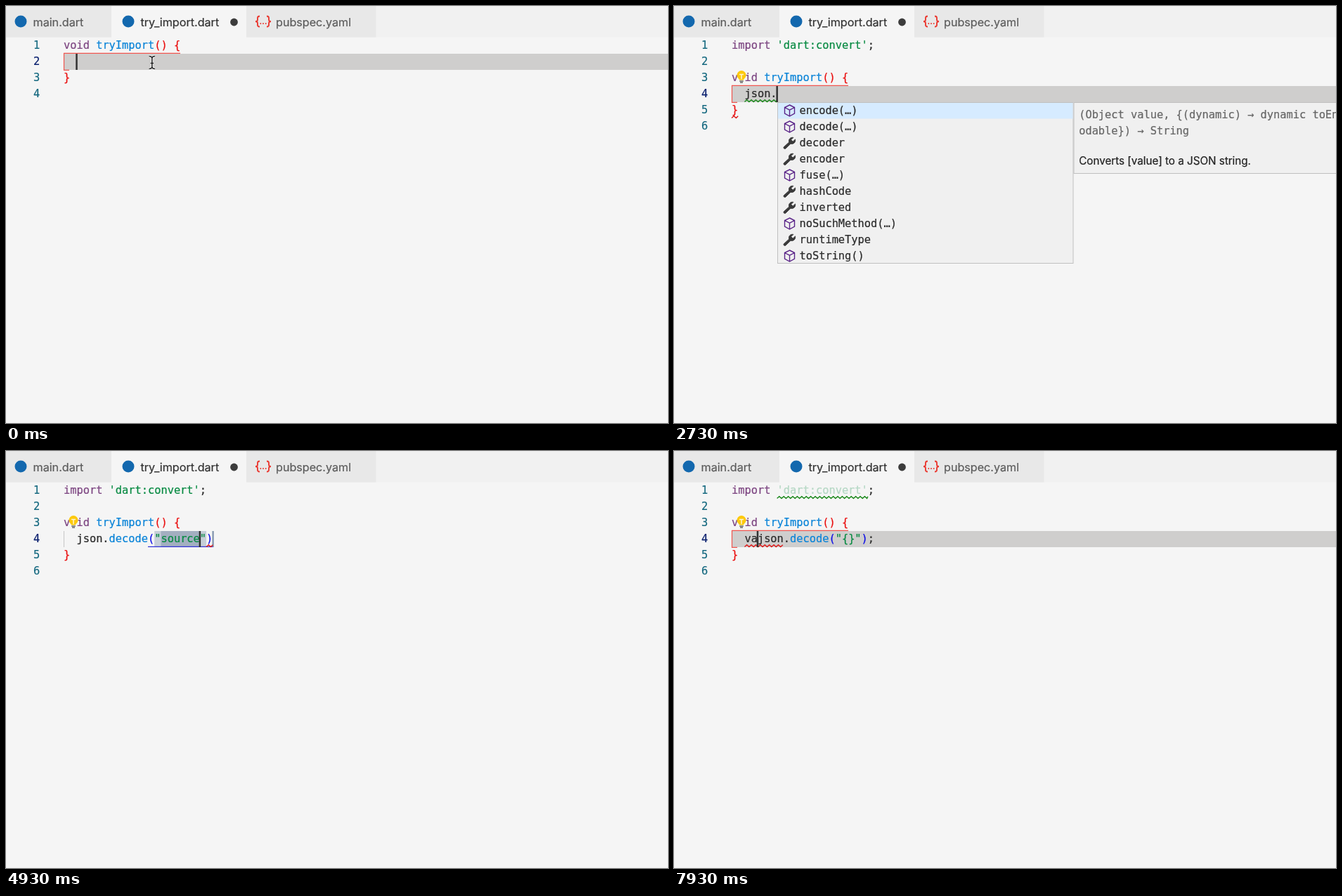
An HTML page for the animation above (8 s loop, 942 by 594 pixels).

```html
<!DOCTYPE html>
<html lang="en">
<head>
<meta charset="utf-8">
<title>Auto import</title>
<style>
html, body { margin: 0; width: 100%; height: 100%; overflow: hidden; background: #f5f5f5; }
svg { display: block; width: 100%; height: 100%; }
text { white-space: pre; }
.code { font: 15.33px "DejaVu Sans Mono", monospace; }
.ui { font: 15.2px Inter, sans-serif; }
.tab { font-size: 16.15px; }
</style>
</head>
<body>
<svg id="stage" viewBox="0 0 942 594"></svg>
<script>
const LOOP = 8000, CHAR = 9.23, LINE = 23, LEFT = 82, TOP = 45;
const C = {
  ink: '#2b2b2b', keyword: '#7d4682', fn: '#0a84d8', string: '#078a42',
  outer: '#ea1010', inner: '#1010e6', number: '#14687f', active: '#0b216f',
  error: '#dd1c1c', hint: '#1d8a1d'
};
const stage = document.getElementById('stage');

const colX = col => LEFT + col * CHAR;
const rowY = row => TOP + row * LINE;
const rect = (x, y, w, h, fill, extra = '') =>
  `<rect x="${x}" y="${y}" width="${w}" height="${h}" fill="${fill}" ${extra}/>`;
const path = (d, stroke, width = 1.3, fill = 'none') =>
  `<path d="${d}" stroke="${stroke}" stroke-width="${width}" fill="${fill}"/>`;
const circle = (x, y, r, fill) => `<circle cx="${x}" cy="${y}" r="${r}" fill="${fill}"/>`;
// A hairline outline gives the glyphs their slightly heavier look.
const paint = (fill, opacity = 1) =>
  `fill="${fill}" stroke="${fill}" stroke-width=".22" opacity="${opacity}" fill-opacity="${opacity}" stroke-opacity="${opacity}"`;
const text = (x, y, body, fill, cls = 'code') =>
  `<text x="${x}" y="${y}" class="${cls}" ${paint(fill)}>${body}</text>`;
const span = ([body, fill, opacity]) => `<tspan ${paint(fill, opacity)}>${body}</tspan>`;
const codeLine = (row, tokens) => text(LEFT, rowY(row) + 16, tokens.map(span).join(''), C.ink);

function squiggle(row, from, to, color) {
  const y = rowY(row) + 21, end = colX(to);
  let x = colX(from), d = `M${x} ${y + 1.6}`;
  for (let up = true; x < end - 1; up = !up) {
    x = Math.min(x + 3.2, end);
    d += `L${x} ${up ? y - 1.3 : y + 1.6}`;
  }
  return path(d, color, 1.4);
}

const icons = {
  method: path('M0-8L7-4.5V4L0 8L-7 4V-4.5ZM-7-4.5L0-.8L7-4.5M0-.8V8', '#5a2488', 1.4),
  field: path('M-5.5-4.5H-8V4.5H-5.5M5.5-4.5H8V4.5H5.5', '#424242', 1.5) +
    path('M-5-.8L1.5-4L5-2V1L-1.5 4.2L-5 2.2Z', '#0a57a5', .8, '#0a57a5') +
    path('M-3.6-.5L-1.4.7L3.5-1.6', '#f0f0f0', .9),
  type: path('M-2-1H3M.5-1V5H4', '#b87a1e', 1.4) +
    path('M-8.2-3L-3.5-7.7L0-4.6L-4.8.4Z', '#b87a1e', .6, '#b87a1e') +
    path('M3-1.2L5.4-3.6L8-1L5.6 1.4ZM3 5L5.4 2.6L8 5.2L5.6 7.6Z', '#b87a1e', .5, '#b87a1e'),
  prop: path('M-8.2 5.8L-.8-1C-2-5 1.2-8.6 5.4-7.6L2.2-4.4L4.7-1.9L8-5.1C9-1 5.6 2.3 1.4 1.3L-5.8 8.2Q-7 9-8.2 7.8Q-9 6.8-8.2 5.8Z', '#3a3a3a', .9, '#3a3a3a')
};

const typeRows = name => [['type', name], ['method', name + '(…)']];
const popups = {
  json: {
    match: 4, scroll: true,
    rows: [['field', 'json'], ['method', 'jsonDecode(…)'], ['method', 'jsonEncode(…)'],
      ...typeRows('JsonCodec'), ['method', 'JsonCodec.withReviver(…)'],
      ...['JsonCyclicError', 'JsonDecoder', 'JsonEncoder'].flatMap(typeRows)],
    sign: ["Auto import from 'dart:convert'", '', 'JsonCodec'],
    note: ['An instance of the default implementation of the', '[JsonCodec].']
  },
  members: {
    match: 0,
    rows: [['method', 'encode(…)'], ['method', 'decode(…)'], ['prop', 'decoder'], ['prop', 'encoder'],
      ['method', 'fuse(…)'], ['prop', 'hashCode'], ['prop', 'inverted'], ['method', 'noSuchMethod(…)'],
      ['prop', 'runtimeType'], ['method', 'toString()']],
    sign: ['(Object value, {(dynamic) → dynamic toEnc', 'odable}) → String'],
    note: ['Converts [value] to a JSON string.']
  },
  decode: {
    match: 1,
    rows: [['method', 'decode(…)'], ['prop', 'decoder']],
    sign: ['(String source, {(Object, Object) → dynam', 'ic reviver}) → dynamic'],
    note: ['Parses the string and returns the resulting Json object.']
  }
};

function popup({ match, rows, scroll, sign, note }, col, row) {
  const x = Math.round(colX(col)) + .5, y = rowY(row + 1) + .5, h = rows.length * LINE - 1;
  const docX = x + 421.5, docH = (sign.length + note.length + 1) * LINE + 9;
  const frame = 'stroke="#c0c0c0"';
  let out = rect(docX, y, 450, docH, '#f0f0f0', frame);
  out += rect(x, y, 420.5, h, '#f0f0f0', frame) + rect(x + .5, y + .5, 419.5, LINE - .5, '#d6ebff');
  rows.forEach(([icon, label], i) => {
    const mid = y + 11.5 + i * LINE;
    const head = `<tspan font-weight="bold" ${paint('#0a53a8')}>${label.slice(0, match)}</tspan>`;
    out += `<g transform="translate(${x + 17} ${mid})">${icons[icon]}</g>`;
    out += text(x + 31, mid + 5, (match ? head : '') + label.slice(match), C.ink);
  });
  if (scroll) out += rect(x + 407, y + .5, 13, 131, '#646464', 'fill-opacity=".45"');
  sign.forEach((line, i) => out += text(docX + 7.2, y + 22 + i * LINE, line, '#666'));
  const noteY = y + 19.5 + (sign.length + 1) * LINE;
  note.forEach((line, i) => out += text(docX + 7.2, noteY + i * LINE, line, '#222', 'ui'));
  return out;
}

function tabs() {
  const blue = '#1368ae', red = '#ea3a32';
  return rect(0, 0, 942, 44.5, '#f1f1f1') + rect(0, 0, 150, 44.5, '#e8e8e8') +
    rect(150, 0, 192, 45, '#f5f5f5') + rect(342, 0, 184.5, 44.5, '#e8e8e8') +
    circle(21, 22, 8.5, blue) + circle(174, 22, 8.5, blue) +
    text(38.5, 29, 'main.dart', '#5c5c5c', 'ui tab') +
    text(191.5, 29, 'try_import.dart', '#333', 'ui tab') +
    text(384, 29, 'pubspec.yaml', '#5c5c5c', 'ui tab') +
    circle(324.5, 23, 5.4, '#3c3c3c') +
    path('M361 14.5Q358 14.5 358 17V19.5Q358 22 355 22Q358 22 358 24.5V27Q358 29.5 361 29.5M371 14.5Q374 14.5 374 17V19.5Q374 22 377 22Q374 22 374 24.5V27Q374 29.5 371 29.5', red, 1.9) +
    [362.3, 366, 369.7].map(x => circle(x, 25, 1, red)).join('');
}

function bulb(row) {
  const y = rowY(row);
  return rect(91, y + 3, 9.6, 17, '#f5f5f5') +
    `<g transform="translate(96 ${y + 9})">` +
    path('M-3 5.5C-3 3.5-6.5 2.5-6.5-1.5A6.5 6.5 0 0 1 6.5-1.5C6.5 2.5 3 3.5 3 5.5Z', 'none', 0, '#fdc90d') +
    path('M-3-2.5H3M0-2.5V4', '#fff4cf', 1.5) +
    path('M-2.8 7H2.8M-2 9H2', '#6a6a6a', 1.3) + '</g>';
}

function scope(row) {
  const y = rowY(row) - .6, b = rowY(row + 1) + .3;
  return path(`M${LEFT + 8} ${b}H${LEFT + .5}V${y}H248`, '#f0564f', 1.2);
}

function bodyTokens(s) {
  const tokens = [['  ' + s.word, C.ink]];
  if (s.arg === null) return tokens;
  return [...tokens, ['decode', C.fn], ['(', C.inner], [`"${s.arg}"`, C.string],
    [')', C.inner], [s.tail, C.ink]];
}

function draw(s, caretOn) {
  const first = s.imported ? 2 : 0, row = first + 1, y = rowY(row);
  const argEnd = s.arg === null ? 0 : 16 + s.arg.length;
  let out = rect(0, 0, 942, 594, '#f5f5f5') + tabs();

  if (s.selected) {
    out += rect(LEFT, y, 1, LINE, '#c6c6c6') +
      rect(colX(15), y, CHAR * s.arg.length, LINE, '#c9ced7');
  } else {
    out += rect(LEFT, y, 860, LINE, '#cfcecd');
  }
  if (s.snippet) {
    const tint = 'rgb(10,50,100)';
    out += rect(colX(14), y, colX(argEnd) - colX(14), LINE, tint, 'fill-opacity=".2"') +
      rect(colX(argEnd + 1) - .8, y, 2.2, LINE, tint, 'fill-opacity=".5"') +
      path(`M${colX(13)} ${y + 22.4}H${colX(argEnd + 1)}`, '#3434d8', 1.2);
  } else {
    out += scope(row);
  }

  for (let i = 0; i < first + 4; i++) {
    out += text(39, rowY(i) + 16, i + 1, i === row ? C.active : C.number);
  }
  if (s.imported) {
    out += codeLine(0, [['import ', C.keyword], ["'dart:convert'", C.string, s.unused ? .5 : 1], [';', C.ink]]);
  }
  out += codeLine(first, [['void ', C.keyword], ['tryImport', C.fn], ['() {', C.outer]]);
  out += codeLine(row, bodyTokens(s));
  out += codeLine(row + 1, [['}', C.outer]]);

  for (const [line, from, to, color] of s.marks) out += squiggle(line, from, to, color);
  if (s.bulb) out += bulb(first);
  if (caretOn) out += rect(colX(s.col) - 1.2, y, 2.5, LINE, '#333');
  if (s.popup) out += popup(popups[s.popup], s.col, row);
  if (s.mouse) {
    const beam = 'M203.5 71.5Q207.8 71.5 207.8 75V86Q207.8 89.5 203.5 89.5M212 71.5Q207.8 71.5 207.8 75M207.8 86Q207.8 89.5 212 89.5M205.5 81.5H210';
    out += path(beam, '#fff', 3) + path(beam, '#222', 1.5);
  }
  return out;
}

// Each step overrides the one before; "col" marks a keystroke and restarts the caret blink.
const steps = [
  [0, { word: '', arg: null, tail: '', col: 2, mouse: true, marks: [] }],
  [1000, { word: 'j', col: 3, mouse: false }],
  [1130, { word: 'js', col: 4 }],
  [1270, { word: 'jso', col: 5 }],
  [1400, { word: 'json', col: 6 }],
  [1470, { popup: 'json' }],
  [1600, { bulb: true, marks: [[1, 2, 6, C.error]] }],
  [2130, { imported: true, popup: '', col: 6, marks: [[3, 2, 6, C.error]] }],
  [2530, { word: 'json.', col: 7 }],
  [2670, { popup: 'members', marks: [[3, 2, 7, C.hint], [4, 0, 1, C.error]] }],
  [3600, { word: 'json.d', col: 8, popup: 'decode', marks: [[3, 2, 7, C.hint], [3, 7, 8, C.error]] }],
  [4470, { word: 'json.', arg: 'source', col: 21, popup: '', snippet: true, selected: true, marks: [] }],
  [4670, { marks: [[3, 22, 23, C.error]] }],
  [5530, { arg: '{', col: 16, selected: false, marks: [[3, 17, 18, C.error]] }],
  [5730, { arg: '{}', col: 17, marks: [[3, 18, 19, C.error]] }],
  [7070, { tail: ';', col: 20, snippet: false, marks: [] }],
  [7400, { col: 2 }],
  [7670, { word: 'vjson.', col: 3 }],
  [7800, { word: 'vajson.', col: 4 }],
  [7870, { unused: true, marks: [[0, 7, 21, C.hint], [3, 2, 8, C.error]] }]
];
const states = [];
for (const [at, change] of steps) {
  const key = 'col' in change ? { key: at } : {};
  states.push({ ...states.at(-1), ...change, ...key, at });
}

let shown = '';
function update(time) {
  const t = time % LOOP;
  const s = states.findLast(state => state.at <= t);
  const caretOn = (t - s.key) % 1000 < 500;
  const id = s.at + ':' + caretOn;
  if (id !== shown) stage.innerHTML = draw(s, caretOn);
  shown = id;
}

const start = performance.now();
function tick() {
  update(performance.now() - start);
  requestAnimationFrame(tick);
}
tick();
</script>
</body>
</html>
```
